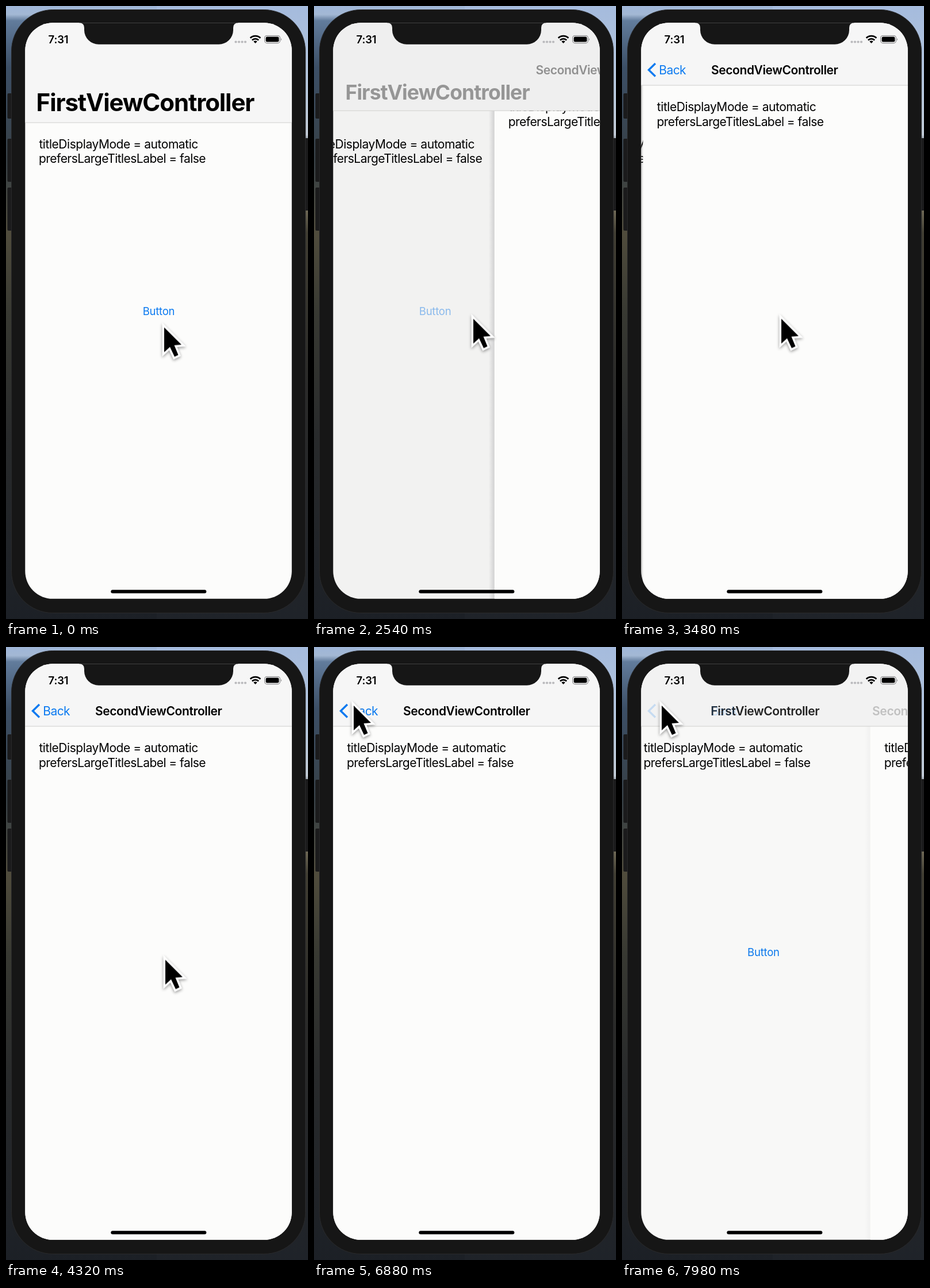
An HTML page that plays this animation: 525x1067 px, repeating every 8 s.

```html
<!DOCTYPE html>
<html lang="en">
<head>
<meta charset="utf-8">
<title>Navigation push and pop</title>
<style>
  @property --push { syntax: "<number>"; inherits: true; initial-value: 0; }
  @property --bar  { syntax: "<number>"; inherits: true; initial-value: 0; }
  @property --pop  { syntax: "<number>"; inherits: true; initial-value: 0; }

  html, body { margin: 0; width: 100%; height: 100%; overflow: hidden; background: #161616; }

  svg {
    display: block;
    width: 525px;
    height: 1067px;
    font-family: Inter, Roboto, sans-serif;
    --p: calc(var(--push) - var(--pop));
    animation: push 8s infinite, bar 8s infinite, pop 8s infinite;
  }
  @keyframes push {
    0%, 29.75% { --push: 0; animation-timing-function: cubic-bezier(.15, .45, .2, 1); }
    46%, 100% { --push: 1; }
  }
  @keyframes bar {
    0%, 29.75% { --bar: 0; animation-timing-function: cubic-bezier(.25, .4, .3, 1); }
    42.25%, 100% { --bar: 1; }
  }
  /* the loop ends before the pop has settled */
  @keyframes pop {
    0%, 92.5% { --pop: 0; animation-timing-function: cubic-bezier(.23, .36, .35, .78); }
    100% { --pop: .869; }
  }

  .label { font-size: 21px; letter-spacing: -.026em; }
  .loose { letter-spacing: -.021em; }
  .title { font-size: 21px; font-weight: 600; letter-spacing: -.019em; text-anchor: middle; }
  .large { font-size: 42px; font-weight: 700; letter-spacing: -.0265em; }
  .time { font-size: 18.5px; font-weight: 600; letter-spacing: -.01em; text-anchor: middle; }
  .button { font-size: 18.5px; letter-spacing: -.012em; text-anchor: middle; }
  .blue { fill: #0a79f0; }

  .first { transform: translateX(calc(var(--p) * -139px)); }
  .second { transform: translateX(calc((1 - var(--p)) * 464px)); }
  .dim { opacity: calc(var(--p) * .1); }
  .edge { opacity: calc(4 * var(--p) * (1 - var(--p)) * (1 - .7 * var(--pop))); }

  .bar { transform: translateY(calc(var(--bar) * -65px)); }
  .tint { opacity: calc(.12 * var(--p) * (1 - var(--p))); }
  .large {
    transform: translate(calc(52.6px + var(--bar) * 6px), calc(183px - var(--bar) * 61.5px))
               scale(calc(1 - .48 * var(--bar)));
    opacity: calc(1 - 1.6 * var(--push));
  }
  .title-one {
    transform: translateX(calc((1 - var(--pop)) * -112px));
    opacity: var(--pop);
  }
  .title-two {
    transform: translateX(calc((1 - var(--bar)) * 339px + var(--pop) * 326px));
    opacity: calc(var(--push) - .93 * var(--pop));
  }
  .back { opacity: calc(2 * var(--push) - 1 - .95 * var(--pop)); }
  .back text { transform: translateX(calc(var(--pop) * 105px)); }

  .button { animation: press 8s linear infinite; }
  @keyframes press {
    0%, 28.1% { opacity: 1; }
    28.3%, 29.75% { opacity: .2; }
    36.25%, 100% { opacity: 1; }
  }

  /* the labels move up under the compact bar while the page is covered */
  .settle { animation: settle 8s step-end infinite; }
  @keyframes settle {
    0% { transform: translateY(0); }
    50%, 100% { transform: translateY(-64.5px); }
  }

  .cursor {
    filter: drop-shadow(0 2px 2.5px rgba(0, 0, 0, .4));
    animation: point 8s infinite ease-in-out;
  }
  @keyframes point {
    0%, 11% { transform: translate(275px, 559.5px); }
    19.5%, 66% { transform: translate(277px, 544.5px); }
    68% { transform: translate(275px, 546.5px); }
    84%, 100% { transform: translate(69px, 102px); }
  }
</style>
</head>
<body>
<svg viewBox="0 0 525 1067">
  <defs>
    <linearGradient id="left" x2="0" y2="1">
      <stop offset="0" stop-color="#9fb6d8"/>
      <stop offset=".014" stop-color="#a3b8d4"/>
      <stop offset=".024" stop-color="#627c9c"/>
      <stop offset=".1" stop-color="#3c4f66"/>
      <stop offset=".25" stop-color="#363f45"/>
      <stop offset=".37" stop-color="#504c3c"/>
      <stop offset=".5" stop-color="#383932"/>
      <stop offset=".7" stop-color="#282a2b"/>
      <stop offset="1" stop-color="#1c2026"/>
    </linearGradient>
    <linearGradient id="right" x2="0" y2="1">
      <stop offset="0" stop-color="#a5bbdd"/>
      <stop offset=".14" stop-color="#b4c5da"/>
      <stop offset=".21" stop-color="#bfc8d3"/>
      <stop offset=".225" stop-color="#5b646b"/>
      <stop offset=".335" stop-color="#6b6553"/>
      <stop offset=".37" stop-color="#403d32"/>
      <stop offset=".6" stop-color="#2b2b29"/>
      <stop offset="1" stop-color="#1f2329"/>
    </linearGradient>
    <linearGradient id="shade">
      <stop offset="0" stop-color="#222230" stop-opacity="0"/>
      <stop offset="1" stop-color="#222230" stop-opacity=".17"/>
    </linearGradient>
    <clipPath id="screen"><rect x="33.3" y="29.3" width="463.5" height="1002.5" rx="48"/></clipPath>
    <g id="facts" class="label">
      <text class="loose" x="57.4" y="247.5">titleDisplayMode = automatic</text>
      <text x="57" y="273">prefersLargeTitlesLabel = false</text>
    </g>
  </defs>

  <rect width="263" height="1067" fill="url(#left)"/>
  <rect x="262" width="263" height="1067" fill="url(#right)"/>

  <g fill="#1b1b1c">
    <rect x="2.5" y="152" width="12" height="44" rx="2"/>
    <rect x="2.5" y="231" width="12" height="75" rx="2"/>
    <rect x="2.5" y="316" width="12" height="75" rx="2"/>
    <rect x="515" y="230" width="12" height="126" rx="2"/>
  </g>
  <rect x="9.5" y="6.5" width="511" height="1050" rx="72" fill="#161616" stroke="#2a2a2b"/>

  <g clip-path="url(#screen)">
    <rect x="33" y="29" width="464" height="1003" fill="#fcfcfb"/>
    <g class="first">
      <g class="settle"><use href="#facts"/></g>
      <text class="button blue" x="265.5" y="537.5">Button</text>
    </g>
    <rect class="dim" x="33" y="29" width="464" height="1003" fill="#040400"/>

    <g class="second">
      <rect class="edge" x="23" y="29" width="10" height="1003" fill="url(#shade)"/>
      <rect x="33" y="29" width="464" height="1003" fill="#fcfcfb"/>
      <use href="#facts" y="-64.5"/>
    </g>

    <g class="bar">
      <rect x="33" y="-60" width="464" height="263" fill="#f6f6f6"/>
      <rect class="tint" x="33" y="-60" width="464" height="263"/>
      <rect x="33" y="202.5" width="464" height="1" fill="#cfcfce"/>
    </g>
    <text class="large">FirstViewController</text>
    <text class="title title-one" x="264.5" y="118.5">FirstViewController</text>
    <text class="title title-two" x="265.2" y="118.5">SecondViewController</text>
    <g class="back">
      <path d="M58 100 L46.5 111.2 L58 122.5" fill="none" stroke="#0a79f0" stroke-width="3.4"/>
      <text class="label blue" x="64.2" y="118.5">Back</text>
    </g>

    <text class="time" x="91" y="64.5">7:31</text>
    <g fill="#b9b9bc">
      <circle cx="399.5" cy="62.5" r="2.1"/>
      <circle cx="405" cy="62.5" r="2.1"/>
      <circle cx="410.5" cy="62.5" r="2.1"/>
      <circle cx="416" cy="62.5" r="2.1"/>
    </g>
    <path d="M424.7 55.7A12.4 12.4 0 0 1 442.3 55.7M427.9 59.4A7.9 7.9 0 0 1 439.1 59.4"
          fill="none" stroke="#000" stroke-width="2.8"/>
    <path d="M433.5 65L430.3 61.8A4.5 4.5 0 0 1 436.7 61.8Z"/>
    <rect x="449.6" y="51.6" width="26.8" height="13" rx="4" fill="none" stroke="#8d8d8f" stroke-width="1.2"/>
    <rect x="451.6" y="53.6" width="22.8" height="9" rx="2.3"/>
    <path d="M478 56Q480.4 58 478 60.3Z" fill="#8d8d8f"/>
    <rect x="182.3" y="1016.2" width="166" height="6" rx="3"/>
    <path d="M127 28V29.3Q136 29.3 136 38V42A25 25 0 0 0 161 66.7H370A25 25 0 0 0 395 42V38Q395 29.3 404 29.3V28Z" fill="#161616"/>
  </g>

  <g class="cursor">
    <path d="M0 0L30 30L17.5 31L24.5 48L18 51L10 34L0 43Z"
          stroke="#fff" stroke-width="7" paint-order="stroke"/>
  </g>
</svg>
</body>
</html>
```
